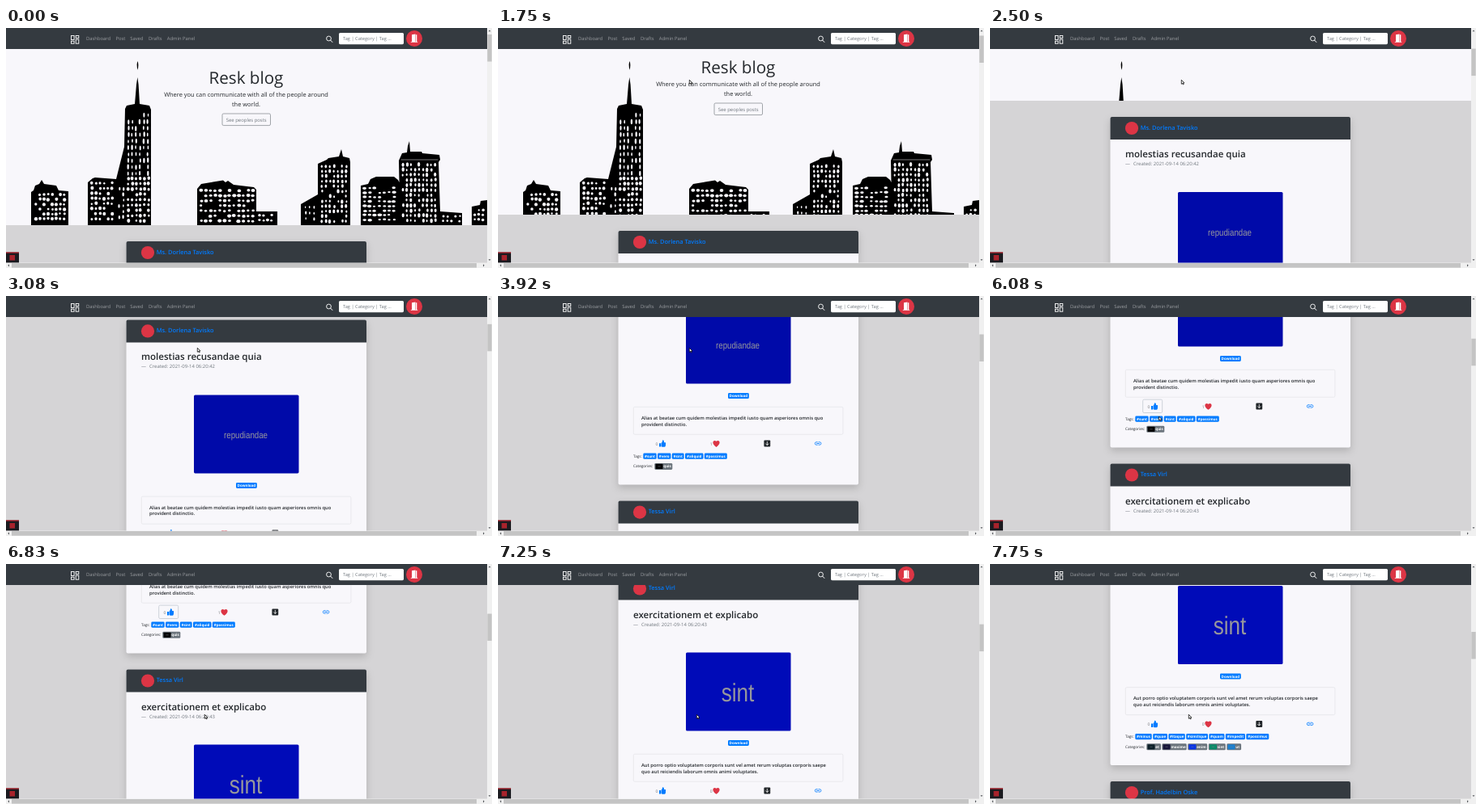
An HTML page that plays this animation: 600x297 px, repeating every 8 s.

```html
<!DOCTYPE html>
<html lang="en">
<head>
<meta charset="utf-8">
<title>Blog scroll</title>
<style>
  html, body { margin: 0; width: 100%; height: 100%; overflow: hidden; }
  svg { display: block; width: 600px; height: 297px; }
  text { font-family: "Open Sans", "Noto Sans", sans-serif; text-rendering: geometricPrecision; fill: #24282c; }
  .mid { text-anchor: middle; }
  .semi { font-weight: 600; }
  .muted { fill: #70777e; }
  .link { fill: #9a9da0; font-size: 5.85px; }
  .name { fill: #007bff; font-size: 7.4px; font-weight: 600; }
  .badge { fill: #fff; font-size: 4.5px; font-weight: 700; }
  .label { font-size: 4.65px; }
  .pic { font-family: "Liberation Sans", Arial, sans-serif; fill: #96979c; text-anchor: middle; }
  .card { filter: drop-shadow(0 4px 5px rgba(0, 0, 0, .17)); }
</style>
</head>
<body>
<svg id="stage" viewBox="0 0 600 297" xmlns="http://www.w3.org/2000/svg"></svg>
<script>
const LOOP = 8000, STEP = 1000 / 12;
const DARK = '#343a40', BLUE = '#007bff', RED = '#dc3545', PALE = '#f8f7fb';

const rect = (x, y, w, h, fill, r = 0, extra = '') =>
  `<rect x="${x}" y="${y}" width="${w}" height="${h}" rx="${r}" fill="${fill}" ${extra}/>`;
const circle = (x, y, r, fill, extra = '') => `<circle cx="${x}" cy="${y}" r="${r}" fill="${fill}" ${extra}/>`;
const path = (d, fill, extra = '') => `<path d="${d}" fill="${fill}" ${extra}/>`;
const line = (d, color, width) =>
  path(d, 'none', `stroke="${color}" stroke-width="${width}" stroke-linecap="round" stroke-linejoin="round"`);
const text = (x, y, str, cls = '', size = 0, extra = '') =>
  `<text x="${x}" y="${y}" class="${cls}" ${size ? `style="font-size:${size}px"` : ''} ${extra}>${str}</text>`;

// Skyline
let seed = 11;
const rnd = () => (seed = (seed * 16807) % 2147483647) / 2147483647;

function windows(x0, y0, x1, y1, dx, dy, rx, ry) {
  let out = '';
  for (let y = y0; y <= y1; y += dy)
    for (let x = x0; x <= x1; x += dx) {
      if (rnd() < .17) continue;
      const k = .65 + rnd() * .5;
      out += `<ellipse cx="${(x + rnd() - .5).toFixed(1)}" cy="${(y + rnd() - .5).toFixed(1)}" rx="${(rx * k).toFixed(2)}" ry="${(ry * k).toFixed(2)}"/>`;
    }
  return out;
}

function skyline() {
  const walls = [
    'M31 245V203L34 201 36 195 41 193 44 188 47 193 62 195 65 201 77 202V245Z',
    'M101 245V191L107 186 110 185 136 187 146 147 147 100 149 96 159 94 161 70 162.3 61 163.6 70 165 94 177 96 179 101V245Z',
    'M162.5 41Q164.2 45 162.5 52Q160.8 46 162.5 41Z',
    'M236 245V199L241 193 268 188.5 271 191 274 189 281 194 306 197 309 200V227L335 227V245Z',
    'M364 245V218L385 206V168L396 163 398 161 411 159 414 150 416 159 424 161 425 166V245Z',
    'M438 245V195L447 193 450 187 457 184 479 184 484 188 485.5 191 485 164 489 155 495 154 496 146 498 140 499 153 513 153 514 155 535 157 536 163 534 166 536 227 563 229V245Z',
    'M575 245V221L585 219 586 214 594 213V245Z'
  ];
  return walls.map(d => path(d, '#000')).join('') + `<g fill="${PALE}">` +
    windows(37, 206, 74, 240, 5, 6, 1.9, 2) +
    windows(106, 192, 133, 240, 5, 6.3, 1.8, 2) +
    windows(140, 192, 147, 240, 5, 7, 1.2, 2.4) +
    windows(151, 108, 176, 180, 4.8, 8, 1.1, 3) +
    windows(151, 186, 176, 240, 5, 6.6, 1.8, 2.2) +
    windows(241, 201, 306, 240, 5.8, 6.3, 2.3, 1.9) +
    windows(313, 232, 332, 240, 5, 6, 1.8, 1.6) +
    windows(370, 222, 384, 240, 5, 7, 1, 2) +
    windows(390, 171, 423, 240, 5, 6.2, 1.5, 2.3) +
    windows(443, 198, 482, 240, 6, 5.6, 2.5, 1.6) +
    windows(490, 169, 532, 240, 5, 6.3, 1.5, 2.4) +
    windows(540, 233, 560, 240, 5, 6, 1.6, 1.6) +
    windows(579, 225, 592, 240, 5, 6, 1.6, 1.6) +
    '</g>' + line('M488 163H533', PALE, .5);
}

// Post cards
const badge = ([label, x, w]) =>
  rect(x, 276, w, 7.2, BLUE, 1.4) + text(x + w / 2, 281.2, label, 'badge mid');

const category = ([label, x, w, color]) =>
  rect(x, 288.3, w, 8, '#6c757d', 1.4) + rect(x + 1.2, 289.2, 9, 6.2, color, .6) +
  line(`M${x + 4.5} 292.3h2.4`, '#777a85', .5) + text(x + 11, 293.9, label, 'badge');

const icons =
  path('M199 263.6h2V268h-2zM201.5 263.5Q203 262 203.2 259.8Q205.2 259.2 205 262.6H206.6Q207.6 263 207 264.4Q207.2 267.8 205.6 268.2H202.8L201.5 267.6Z', BLUE) +
  path('M269.5 268.3C262.5 263.6 265.8 258.6 269.5 261.2C273.2 258.6 276.5 263.6 269.5 268.3Z', RED) +
  rect(328.4, 260, 7.8, 8, '#212529', 1) + line('M332.3 261.8v4M330.6 264.3l1.7 1.7 1.7-1.7', '#fff', .8) +
  line('M394.3 262.2H393a1.7 1.7 0 0 0 0 3.4h1.3M395.9 262.2h1.3a1.7 1.7 0 0 1 0 3.4h-1.3M393.6 263.9h3', BLUE, .8);

function card(y, post) {
  let out = `<g transform="translate(0 ${y})">` +
    rect(148.5, 0, 296.5, 315, PALE, 2, 'class="card"') +
    path('M148.5 28V2a2 2 0 0 1 2-2H443a2 2 0 0 1 2 2V28Z', DARK) +
    circle(175, 14, 8.1, RED) + text(185.7, 15.6, post.name, 'name');
  if (post.title) out +=
    text(167, 50, post.title, 'semi', 11.55) +
    text(167, 60, '—', 'muted', 5.95) + text(177, 60, 'Created: 2021-09-14 ' + post.time, 'muted', 5.95) +
    rect(232, 93, 129.5, 97, post.fill, 1.6) +
    text(0, 0, post.word, 'pic', post.size, `transform="translate(296 ${143 + post.size * .33}) scale(.83 1)"`) +
    rect(284, 201.5, 25.8, 7, BLUE, 1.4) + text(296.9, 206.7, 'Download', 'badge mid') +
    rect(167.3, 218.7, 258.6, 34, PALE, 1.5, 'stroke="#e2e2e7" stroke-width=".7"') +
    post.lines.map((s, i) => text(177, 234.2 + i * 7.8, s, 'semi', 5.8)).join('') +
    (post.focus ? rect(188.7, 255.6, 24, 16.4, PALE, 1.5, 'id="focus" stroke="#c9ced6" stroke-width=".9"') : '') +
    text(194.4, 266, 0, '', 5, 'fill-opacity=".6"') + text(261.8, 266, post.hearts, '', 5, 'fill-opacity=".6"') + icons +
    text(167, 281.3, 'Tags:', 'label') + post.tags.map(badge).join('') +
    text(167, 293.9, 'Categories:', 'label') + post.cats.map(category).join('');
  return out + '</g>';
}

const posts = [
  {
    name: 'Ms. Dorlena Tavisko', title: 'molestias recusandae quia', time: '06:20:42',
    fill: '#000aa9', word: 'repudiandae', size: 11.7, hearts: 1, focus: true,
    lines: ['Alias at beatae cum quidem molestias impedit iusto quam asperiores omnis quo', 'provident distinctio.'],
    tags: [['#sunt', 179.3, 16.4], ['#vero', 197, 16.4], ['#sint', 214.8, 14.8], ['#aliquid', 231, 22.5], ['#possimus', 254.8, 28]],
    cats: [['quis', 193.3, 22, '#050506']]
  },
  {
    name: 'Tessa Virl', title: 'exercitationem et explicabo', time: '06:20:43',
    fill: '#000bb8', word: 'sint', size: 31.5, hearts: 0,
    lines: ['Aut porro optio voluptatem corporis sunt vel amet rerum voluptas corporis saepe', 'quo aut reiciendis laborum omnis animi voluptates.'],
    tags: [['#minus', 179.3, 20.4], ['#quae', 201.2, 17.8], ['#itaque', 220.4, 20.4], ['#similique', 242.2, 26.8], ['#quam', 270.4, 19], ['#impedit', 290.8, 24.2], ['#possimus', 316.3, 28]],
    cats: [['et', 193.3, 17.7, '#0c2029'], ['maxime', 212.4, 30.3, '#17153a'], ['enim', 244.2, 24, '#0a35e6'], ['sint', 269.8, 21, '#0b8a68'], ['ut', 292.3, 17.8, '#1b7fcf']]
  },
  { name: 'Prof. Hadelbin Oske' }
];

const heroText =
  text(296.5, 69, 'Resk blog', 'mid', 20.6) +
  text(296.5, 85.4, 'Where you can communicate with all of the people around', 'mid', 7.44) +
  text(296.5, 97, 'the world.', 'mid', 7.44) +
  rect(267, 106, 59.5, 14.6, 'none', 1.6, 'stroke="#7b8187" stroke-width=".7"') +
  text(296.7, 115.5, 'See peoples posts', 'mid muted', 5.95);

const navbar = rect(0, 0, 594, 26, DARK) +
  [[80.5, 9.5, 5], [86.2, 9.5, 3], [80.5, 16.2, 3], [86.2, 14.2, 5]].map(([x, y, h]) =>
    rect(x, y, 3.6, h, 'none', 0, 'stroke="#fff" stroke-width=".9"')).join('') +
  [['Dashboard', 99], ['Post', 135.5], ['Saved', 153.2], ['Drafts', 176], ['Admin Panel', 198.8]].map(([s, x]) =>
    text(x, 15.4, s, 'link')).join('') +
  circle(398.5, 13, 2.9, 'none', 'stroke="#fff" stroke-width=".9"') + line('M400.7 15.2l2.2 2.3', '#fff', 1) +
  rect(411, 6, 80, 14.2, '#fff', 1.6) + text(416, 15.3, 'Tag | Category | Tag ...', 'muted', 5.7) +
  circle(504, 13, 10, RED) + path('M501 8.3L505.5 7.6V17.2H501ZM506 8.3h1.3v8.9H506ZM499.8 17h8.4v.8h-8.4Z', '#fff');

const chrome =
  rect(0, 277.5, 16, 13.2, '#1b1b20') + rect(0, 277.5, 16, 1, '#d8232f') + rect(4.5, 281, 6.5, 6.5, '#a8232c') +
  rect(0, 290.5, 600, 6.5, '#f0f0f0') + rect(594, 0, 6, 297, '#f0f0f0') +
  rect(7, 291, 574, 5.6, '#c4c4c4') + rect(594.3, 8, 5.4, 33.5, '#c4c4c4', 0, 'id="thumb"') +
  path('M595.5 4.2L597 2.4 598.5 4.2ZM595.5 286.3L597 288.1 598.5 286.3ZM4 292.2L2.3 293.8 4 295.4ZM589 292.2L590.7 293.8 589 295.4Z', '#55585c');

document.getElementById('stage').innerHTML =
  rect(0, 0, 600, 297, PALE) + skyline() +
  '<g id="page">' + rect(0, 244, 600, 1400, '#d5d4d6') + heroText +
  posts.map((p, i) => card(264 + 335 * i, p)).join('') + '</g>' +
  navbar + chrome +
  path('M0 0V5L1.2 4 2 5.7 2.9 5.3 2.1 3.7H3.7Z', '#fff', 'id="cursor" stroke="#000" stroke-width=".75"');

// Motion: [time, ...values]
const scrollKeys = [
  [0, 0], [1583, 0], [1667, 3], [1750, 13], [2417, 149], [2500, 154], [2583, 156.4],
  [2750, 156.4], [2833, 168], [3083, 234.6], [3417, 234.6], [3500, 244], [3917, 345.5], [4167, 391.5],
  [6500, 391.5], [6583, 400], [7250, 582.5], [7333, 587], [7750, 665], [8000, 665]
];
const cursorKeys = [
  [0, 188, 277], [1160, 188, 277], [1417, 236.3, 64.3], [4417, 236.3, 64.3],
  [5250, 203, 138], [5667, 203, 138], [6083, 208.5, 149], [6500, 245.3, 186.3], [8000, 245.3, 186.3]
];

function at(keys, t) {
  let i = 1;
  while (i < keys.length - 1 && keys[i][0] < t) i++;
  const a = keys[i - 1], b = keys[i], k = Math.min(1, (t - a[0]) / (b[0] - a[0]));
  return a.slice(1).map((v, j) => v + (b[j + 1] - v) * k);
}

const [page, thumb, cursor, focus] = ['page', 'thumb', 'cursor', 'focus'].map(id => document.getElementById(id));
const start = performance.now();

function draw() {
  const now = (performance.now() - start) % LOOP;
  const t = Math.floor((now + 4) / STEP) * STEP;
  const [y] = at(scrollKeys, t), [cx, cy] = at(cursorKeys, t);
  page.setAttribute('transform', `translate(0 ${-y})`);
  thumb.setAttribute('y', 8 + y * .1143);
  cursor.setAttribute('transform', `translate(${cx} ${cy})`);
  cursor.style.visibility = t > 1160 ? 'visible' : 'hidden';
  focus.style.visibility = t > 5400 ? 'visible' : 'hidden';
  requestAnimationFrame(draw);
}
draw();
</script>
</body>
</html>
```
